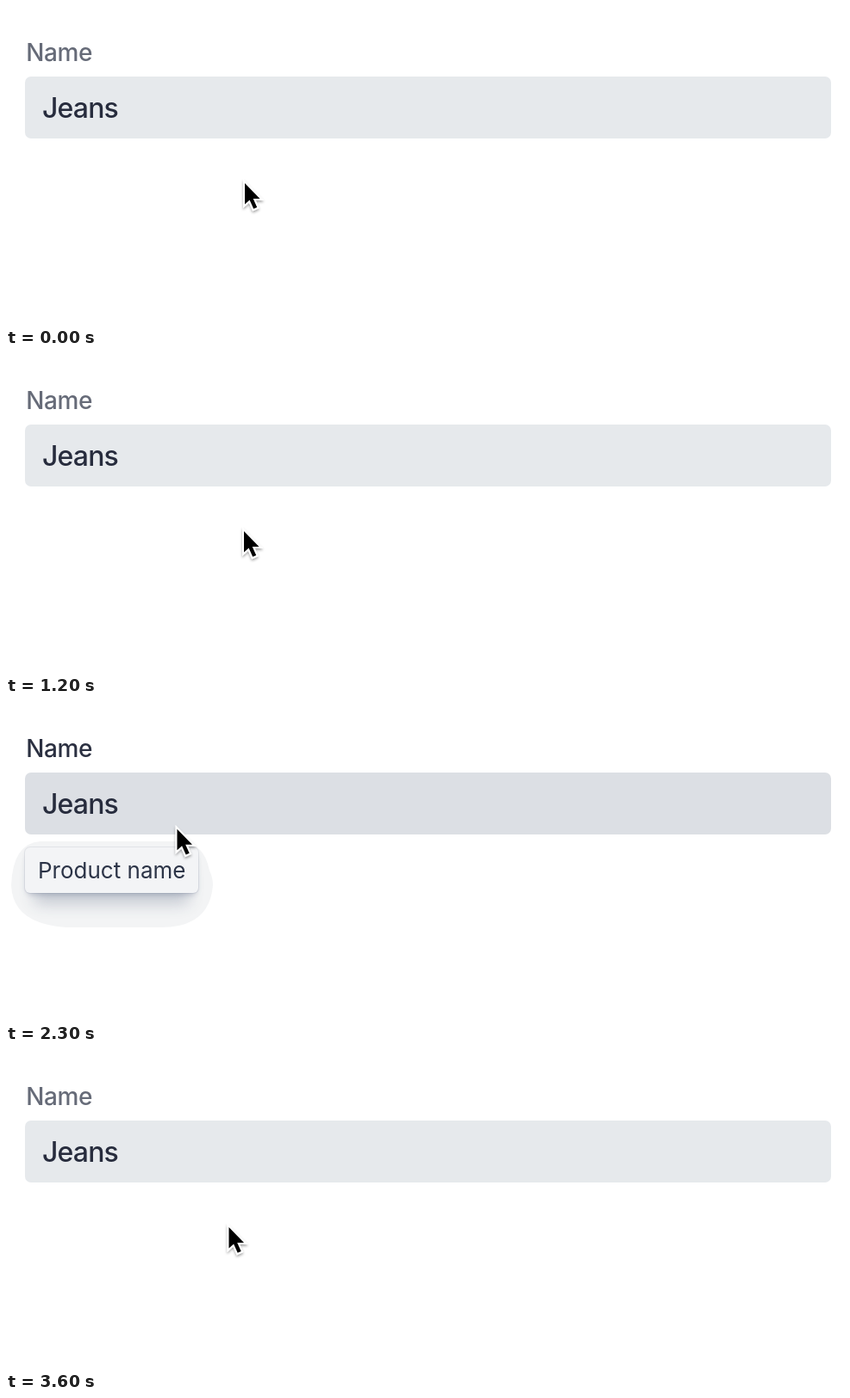
An HTML page for the animation above (4 s loop, 972 by 372 pixels).

```html
<!DOCTYPE html>
<html lang="en">
<head>
<meta charset="utf-8">
<title>Field tooltip</title>
<style>
  html, body { margin: 0; width: 100%; height: 100%; overflow: hidden; background: #fff; }
  svg { display: block; width: 972px; height: 372px; }
  text { font-family: Inter, "Liberation Sans", sans-serif; font-weight: 500; }
  #label { font-size: 28px; letter-spacing: -.4px; fill: #666b78; }
  #field { fill: #e6e9ec; }
  #value { font-size: 32px; letter-spacing: -.85px; fill: #272c3d; }
  #tip { visibility: hidden; }
  #tip text { font-size: 26px; font-weight: 400; fill: #2c3447; }
  .hover #label { fill: #2b3041; }
  .hover #field { fill: #dcdfe4; }
  .hover #tip { visibility: visible; }
</style>
</head>
<body>
<svg id="stage" viewBox="0 0 972 372">
  <defs>
    <filter id="soft" x="-30%" y="-60%" width="160%" height="220%"><feGaussianBlur stdDeviation="9"/></filter>
    <filter id="near" x="-20%" y="-40%" width="140%" height="180%"><feGaussianBlur stdDeviation="3"/></filter>
    <filter id="drop" x="-50%" y="-50%" width="200%" height="200%">
      <feDropShadow dx="0" dy="2" stdDeviation="1.5" flood-opacity=".35"/>
    </filter>
  </defs>
  <text id="label" x="23.3" y="64">Name</text>
  <rect id="field" x="22" y="82" width="935" height="72" rx="7"/>
  <text id="value" x="42" y="130">Jeans</text>
  <g id="tip">
    <path fill="#f3f4f5" d="M40 162H202Q230 164 236 196Q240 204 240 213Q236 262 180 262H70Q8 258 6 213Q8 164 40 162Z"/>
    <rect x="32" y="186" width="181" height="49" rx="8" fill="#28385c" opacity=".22" filter="url(#soft)"/>
    <rect x="24" y="174" width="197" height="50" rx="6" fill="#28385c" opacity=".22" filter="url(#near)"/>
    <rect x="21" y="168" width="203" height="55" rx="7" fill="#28385c" opacity=".08"/>
    <rect x="22" y="169" width="201" height="53" rx="6" fill="#f3f4f6"/>
    <text x="37" y="205">Product name</text>
  </g>
  <g id="cursor" filter="url(#drop)">
    <path d="M0 0V24.5L5.6 19.5L10.2 29.8L14.2 28L9.7 18H17.5Z"
      fill="#000" stroke="#fff" stroke-width="4" paint-order="stroke" stroke-linejoin="miter"/>
  </g>
</svg>
<script>
  const LOOP = 4000, STEP = 100, FIELD_BOTTOM = 154;
  const home = { x: 277, y: 206 };
  // Each move eases the pointer from wherever the last one ended.
  const moves = [
    { start: 100, steps: 4, x: 174, y: 133 },
    { start: 700, steps: 6, x: 276, y: 206 },
    { start: 1700, steps: 4, x: 226, y: 163.5 },
    { start: 2100, steps: 5, x: 192, y: 144 },
    { start: 2800, steps: 1, x: 211, y: 152 },
    { start: 2900, steps: 4, x: 252.5, y: 194 },
    { start: 3400, steps: 3, x: 258.5, y: 206 }
  ];
  const stage = document.getElementById("stage");
  const cursor = document.getElementById("cursor");
  const easeOut = p => Math.sin(p * Math.PI / 2);

  function pointerAt(time) {
    let { x, y } = home;
    for (const move of moves) {
      if (time < move.start) break;
      const step = Math.floor((time - move.start) / STEP) + 1;
      const p = easeOut(Math.min(step / move.steps, 1));
      x += (move.x - x) * p;
      y += (move.y - y) * p;
    }
    return { x, y };
  }

  function draw() {
    const { x, y } = pointerAt(performance.now() % LOOP);
    cursor.setAttribute("transform", `translate(${x} ${y})`);
    stage.classList.toggle("hover", y < FIELD_BOTTOM);
    requestAnimationFrame(draw);
  }
  draw();
</script>
</body>
</html>
```
